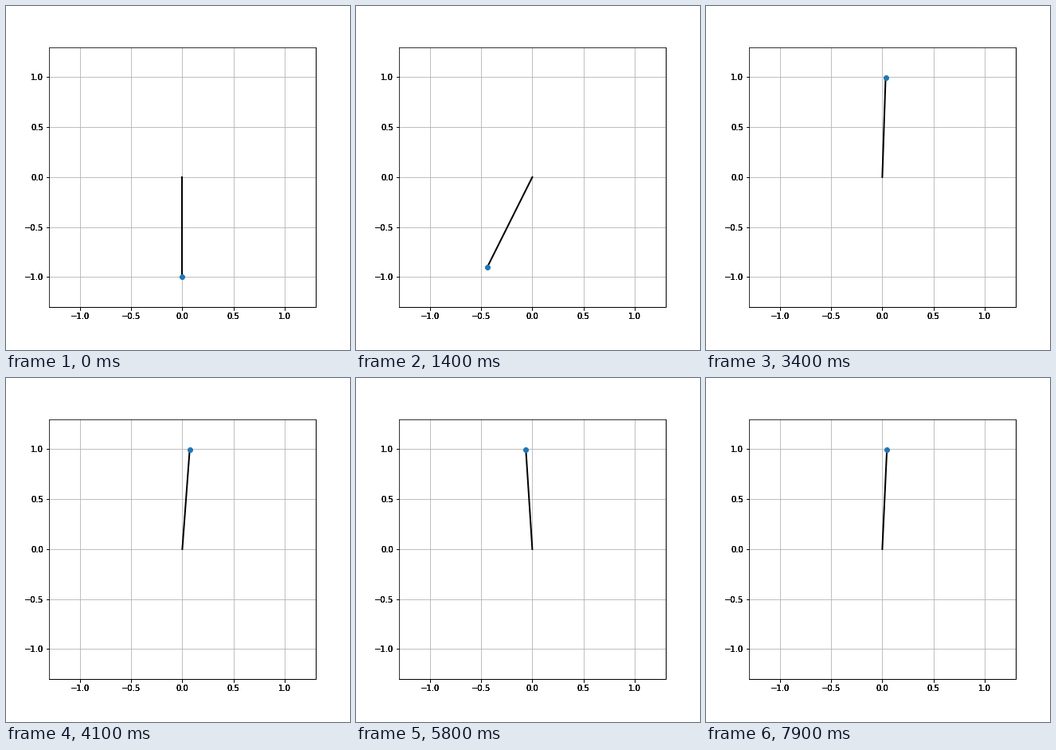
Recreate the animation shown at these times as a matplotlib script. Size 432 by 432 pixels, loop 8 s.

```python
import numpy as np
import matplotlib.pyplot as plt
from matplotlib.animation import FuncAnimation

FRAMES, STEP = 80, 0.1
LIMIT = 1.3
TICKS = np.arange(-1, 1.1, 0.5)
BOX = [0.125, 0.125, 0.775, 0.755]

PUSH_END, TOP_TIME = 0.93, 2.6      # seconds
PUSH_ANGLE = 0.98                   # radians from straight down
# Turning points while balancing: (seconds, lean to the right)
LEANS = [(TOP_TIME, 0.004), (4.6, 0.085), (5.8, -0.063),
         (7.05, 0.06), (7.9, 0.045)]


def smooth(u):
    return u * u * (3 - 2 * u)


def lean_at(t):
    """Ease from one turning point to the next."""
    for (t0, a), (t1, b) in zip(LEANS, LEANS[1:]):
        if t <= t1:
            return a + (b - a) * smooth((t - t0) / (t1 - t0))
    return LEANS[-1][1]


def angle_at(t):
    """Push to the right, swing up through the left, then balance."""
    if t < PUSH_END:
        return PUSH_ANGLE * smooth(t / PUSH_END)
    if t < TOP_TIME:
        v = (t - PUSH_END) / (TOP_TIME - PUSH_END)
        rise = 1 - (1 - v ** 1.5) ** 2.64
        return PUSH_ANGLE - rise * (PUSH_ANGLE + np.pi + LEANS[0][1])
    return -np.pi - lean_at(t)


def add_plot(name):
    ax = fig.add_axes(BOX, label=name)
    ax.set(xlim=(-LIMIT, LIMIT), ylim=(-LIMIT, LIMIT),
           xticks=TICKS, yticks=TICKS)
    return ax


plt.rcParams["font.family"] = "DejaVu Sans"
fig = plt.figure(figsize=(6, 6), dpi=72, facecolor="white")
ax = add_plot("main")
ax.grid(True)
rod, = ax.plot([], [], color="black", lw=2)
bob, = ax.plot([], [], "o", color="tab:blue", ms=6)

# Stacked frames make the antialiased labels heavier
for n in range(3):
    layer = add_plot(f"layer{n}")
    layer.patch.set_visible(False)
    layer.spines[["top", "left"]].set_visible(False)


def update(frame):
    a = angle_at(frame * STEP)
    x, y = np.sin(a), -np.cos(a)
    rod.set_data([0, x], [0, y])
    bob.set_data([x], [y])
    return rod, bob


anim = FuncAnimation(fig, update, frames=FRAMES, interval=1000 * STEP,
                     init_func=lambda: update(0), repeat=True, repeat_delay=0)
plt.show()
```
